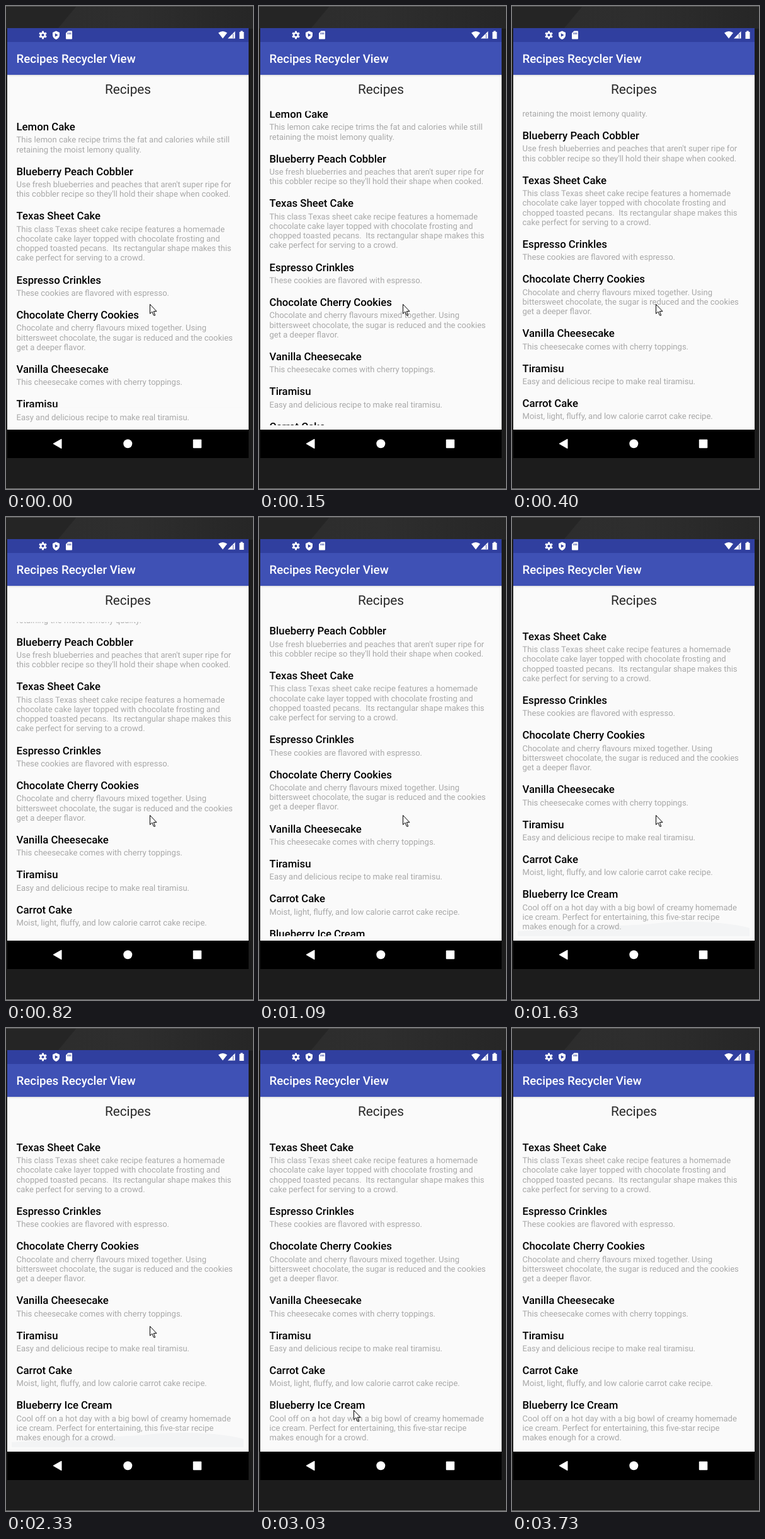
An HTML page for the animation above (4.17 s loop, 392 px wide and 765 px high).

```html
<!DOCTYPE html>
<html lang="en">
<head>
<meta charset="utf-8">
<title>Recipes Recycler View</title>
<style>
  html, body { margin: 0; width: 100%; height: 100%; overflow: hidden; background: #1c1c1c; }
  svg { display: block; width: 392px; height: 765px; }
  text { font-family: Roboto, "Liberation Sans", sans-serif; text-rendering: geometricPrecision; white-space: pre; }
  .bar { font-size: 18.8px; font-weight: 500; fill: #fff; }
  .head { font-size: 20.8px; fill: #2a2a2a; text-anchor: middle; }
  .name { font-size: 16.77px; font-weight: 500; fill: #000; }
  .note { font-size: 13.04px; fill: #a8a8a8; }
</style>
</head>
<body>
<svg viewBox="0 0 392 765">
  <defs>
    <linearGradient id="sheen" gradientUnits="userSpaceOnUse" x1="0" y1="0" x2="392" y2="0">
      <stop offset="0" stop-color="#2c2c2c"/>
      <stop offset=".5" stop-color="#2e2e2e"/>
      <stop offset="1" stop-color="#262626"/>
    </linearGradient>
    <linearGradient id="shade" x2="0" y2="1">
      <stop offset="0" stop-color="#000" stop-opacity=".12"/>
      <stop offset="1" stop-color="#000" stop-opacity="0"/>
    </linearGradient>
    <clipPath id="view"><path d="M2 166.500H385V664H2z"/></clipPath>
  </defs>

  <!-- Device body -->
  <path d="M0 0H392V765H0z" fill="#1c1c1c"/>
  <path d="M0 0H392V36H0z" fill="url(#sheen)"/>
  <path d="M0 0H112L82 36H0z" fill="#252525"/>
  <path d="M0 0H392V1H0z" fill="#555"/>
  <path d="M0 764H392V765H0z" fill="#777"/>

  <!-- Screen -->
  <path d="M2 109H385V671H2z" fill="#fafafa"/>
  <path d="M2 35H385V57H2z" fill="#303f9f"/>
  <path d="M2 57H385V109H2z" fill="#3f51b5"/>
  <path d="M2 109H385V112H2z" fill="url(#shade)"/>
  <path d="M2 671H385V716H2z" fill="#000"/>

  <!-- Status icons -->
  <g fill="#fff">
    <g id="gear" transform="translate(58.500 46)"></g>
    <path d="M79.500 39.500L85 42V46C85 49.300 82.500 52 79.500 53C76.500 52 74 49.300 74 46V42z"/>
    <path d="M77.800 43.300L82.500 46L77.800 48.800z" fill="#303f9f"/>
    <path d="M98.500 39.500H104Q105 39.500 105 40.500V51.500Q105 52.500 104 52.500H96Q95 52.500 95 51.500V43z"/>
    <path d="M98.200 42V45M100.500 42V45M102.700 42V45" stroke="#303f9f"/>
    <path d="M337 42.500Q344 37.500 351 42.500L344 51.500z"/>
    <path d="M352 51.500L363.500 40V51.500z"/>
    <path d="M360.500 44V51" stroke="#303f9f" stroke-width=".8"/>
    <path d="M372.300 39.500H375.700V41H377.500V52H370.500V41H372.300z"/>
  </g>

  <text class="bar" x="16.500" y="90.300">Recipes Recycler View</text>
  <text class="head" x="193.500" y="139">Recipes</text>

  <path id="ripple" d="M9 656Q120 650 215 645Q270 638 330 643Q360 646 377 651V664H9z" fill="#f3f4f5"/>
  <g clip-path="url(#view)"><g id="list"></g></g>
  <path id="seam" d="M9 635.500H377V639H9z" fill="#fafafa"/>

  <!-- Navigation -->
  <g fill="#fff">
    <path d="M75 693.300L88 686V700.700z" stroke="#fff" stroke-linejoin="round"/>
    <circle cx="193.300" cy="693.300" r="7"/>
    <rect x="296.800" y="686.500" width="13.500" height="13.800" rx="1"/>
  </g>

  <path id="cursor" d="M.5 .5V15.300L3.900 12.100L6.400 18H8.700L6.300 11.600H11z" fill="#fff" stroke="#000"/>
</svg>
<script>
const LOOP = 4170;
const LINE = 15.28;
const NS = "http://www.w3.org/2000/svg";
const $ = id => document.getElementById(id);

const recipes = [
  ["Lemon Cake", "This lemon cake recipe trims the fat and calories while still", "retaining the moist lemony quality."],
  ["Blueberry Peach Cobbler", "Use fresh blueberries and peaches that aren't super ripe for", "this cobbler recipe so they'll hold their shape when cooked."],
  ["Texas Sheet Cake", "This class Texas sheet cake recipe features a homemade", "chocolate cake layer topped with chocolate frosting and", "chopped toasted pecans.  Its rectangular shape makes this", "cake perfect for serving to a crowd."],
  ["Espresso Crinkles", "These cookies are flavored with espresso."],
  ["Chocolate Cherry Cookies", "Chocolate and cherry flavours mixed together. Using", "bittersweet chocolate, the sugar is reduced and the cookies", "get a deeper flavor."],
  ["Vanilla Cheesecake", "This cheesecake comes with cherry toppings."],
  ["Tiramisu", "Easy and delicious recipe to make real tiramisu."],
  ["Carrot Cake", "Moist, light, fluffy, and low calorie carrot cake recipe."],
  ["Blueberry Ice Cream", "Cool off on a hot day with a big bowl of creamy homemade", "ice cream. Perfect for entertaining, this five-star recipe", "makes enough for a crowd."]
];

function add(parent, tag, attrs, content = "") {
  const node = document.createElementNS(NS, tag);
  for (const key in attrs) node.setAttribute(key, attrs[key]);
  node.textContent = content;
  parent.append(node);
}

function buildList() {
  let y = 197;
  for (const [name, ...notes] of recipes) {
    add($("list"), "text", { class: "name", x: 16.5, y }, name);
    notes.forEach((note, i) =>
      add($("list"), "text", { class: "note", x: 16.5, y: y + 19.3 + i * LINE }, note));
    y += 40.1 + notes.length * LINE;
  }
}

function buildGear() {
  add($("gear"), "circle", { r: 4.5 });
  for (let a = 0; a < 360; a += 60)
    add($("gear"), "rect", { x: -1.5, y: -6.3, width: 3, height: 4, transform: `rotate(${a})` });
  add($("gear"), "circle", { r: 2.1, fill: "#303f9f" });
}

// [start time, scroll distance]
const scrollSteps = [[0, 0], [150, 20], [270, 43], [400, 56.6], [820, 64], [940, 73],
  [1090, 81.3], [1220, 86], [1340, 88], [1490, 116], [1630, 143.6]];
// [start time, x, y]
const cursorSteps = [[0, 228, 472], [2610, 143, 604], [2760, 141, 605], [3030, 150, 605],
  [3180, 214, 661], [3300, 288, 724], [3430, 336, 761], [3730, 400, 780]];

const at = (steps, t) => steps.filter(step => step[0] <= t).pop();
const show = (id, on) => $(id).setAttribute("visibility", on ? "visible" : "hidden");

function draw(t) {
  const [, x, y] = at(cursorSteps, t);
  $("list").setAttribute("transform", `translate(0 ${-at(scrollSteps, t)[1]})`);
  $("cursor").setAttribute("transform", `translate(${x} ${y})`);
  show("ripple", t >= 1630 && t < 2610);
  show("seam", t < 150);
}

const begin = performance.now();
function tick() {
  draw((performance.now() - begin) % LOOP);
  requestAnimationFrame(tick);
}

buildList();
buildGear();
tick();
</script>
</body>
</html>
```
